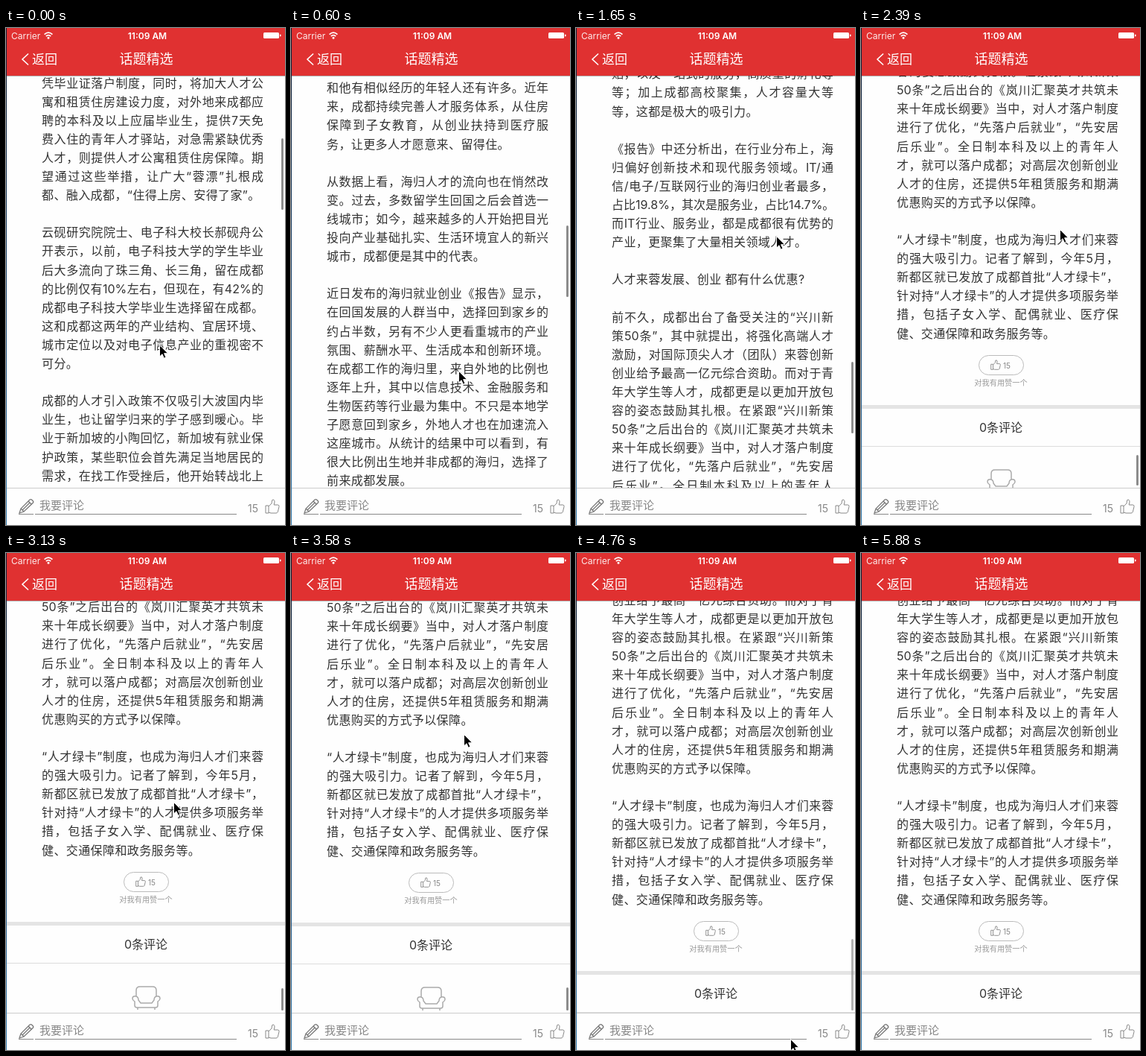
Animation, 375 px wide and 667 px high, one loop 5.91 s. Source, as an HTML page:

```html
<!DOCTYPE html>
<html lang="zh-CN">
<head>
<meta charset="utf-8">
<style>
html, body { margin: 0; width: 100%; height: 100%; overflow: hidden; }
body { position: relative; background: #fefefe; color: #333; font: 16px Inter, "Noto Sans CJK SC", sans-serif; text-spacing-trim: space-all; }
body * { position: absolute; box-sizing: border-box; white-space: pre; }
svg { fill: none; stroke: #888; overflow: visible; }
#page { left: 0; top: 0; width: 375px; }
.line { left: 48px; width: 298px; height: 25px; line-height: 25px; text-align-last: justify; }
.line.last { text-align-last: left; letter-spacing: .4px; }
.mid { left: 1px; width: 374px; text-align: center; }
#bar { left: 370px; width: 3px; border-radius: 2px; background: #8c8c8c; }
#head { left: 0; top: 0; width: 375px; height: 64px; background: #e03131; color: #fff; box-shadow: 0 1px rgba(0, 0, 0, .3); }
#foot { left: 0; top: 617px; width: 375px; height: 50px; background: #fefefe; border-top: 1px solid #ccc; color: #888; font-size: 15px; line-height: 20px; }
#edge { left: 0; top: 0; width: 1px; height: 667px; background: linear-gradient(#101c30, #24507a 55%, #3d83b5); }
</style>
</head>
<body>
<svg width="0" height="0"><symbol id="like" viewBox="0 0 20 20" overflow="visible">
  <path d="M1 9h4v10H1zM5 10l4-4 .8-4.500q3-1.500 3.200 2.500l-.8 4h5.300q2 .3 1.500 2.500l-1.700 7q-.6 1.500-2.300 1.500H8l-3-1"/>
</symbol></svg>

<div id="page"></div>
<div id="bar"></div>

<div id="head">
  <span style="left:7px;top:3px;font-size:12px;line-height:15px;opacity:.9">Carrier</span>
  <svg style="left:51px;top:5px;stroke:#fff;stroke-width:1.700" width="12" height="10"><path d="M.6 3.600q5.400-5 10.800 0M2.800 6q3.200-2.800 6.400 0"/><circle cx="6" cy="8.300" r=".7"/></svg>
  <b style="left:0;width:380px;top:3px;text-align:center;font-size:12px;line-height:15px;font-weight:600">11:09 AM</b>
  <svg style="left:346px;top:6px;stroke:none;fill:#fff" width="24" height="8"><rect width="21" height="8" rx="1.500"/><rect x="22" y="2.500" width="1.500" height="3" rx=".7"/></svg>
  <svg style="left:21px;top:34px;stroke:#fff;stroke-width:1.600" width="10" height="16"><path d="M9 .5L1 8l8 7.500"/></svg>
  <span style="left:35px;top:30px;font-size:17px;line-height:24px">返回</span>
  <span style="left:0;width:377px;top:30px;text-align:center;font-size:18px;line-height:24px">话题精选</span>
</div>

<div id="foot">
  <svg style="left:17px;top:13px;stroke:#777;stroke-width:1.300" width="22" height="22"><path d="M1 20l2-6L15 2q1.500-1 3 .5l1 1q1.500 1.500 0 3L7 18zM3 14l4 4M13 4l4.500 4.500M5.500 15.500L15 6"/></svg>
  <div style="left:17px;top:34px;width:20px;height:1px;background:#888"></div>
  <div style="left:39px;top:34px;width:271px;height:1px;background:#888"></div>
  <span style="left:45px;top:13px">我要评论</span>
  <span style="left:325px;top:17px;font-size:14px">15</span>
  <svg style="left:348px;top:14px" width="20" height="20"><use href="#like"/></svg>
</div>
<div id="edge"></div>
<svg id="cursor" style="left:0;top:0;stroke:#fff;fill:#000" width="13" height="19"><path d="M.5.500v15.500l3.500-3.300 2.400 5.500 2.600-1.100-2.400-5.400h5z"/></svg>

<script>
const text = `凭毕业证落户制度，同时，将加大人才公
寓和租赁住房建设力度，对外地来成都应
聘的本科及以上应届毕业生，提供7天免
费入住的青年人才驿站，对急需紧缺优秀
人才，则提供人才公寓租赁住房保障。期
望通过这些举措，让广大“蓉漂”扎根成
都、融入成都，“住得上房、安得了家”。

云砚研究院院士、电子科大校长郝砚舟公
开表示，以前，电子科技大学的学生毕业
后大多流向了珠三角、长三角，留在成都
的比例仅有10%左右，但现在，有42%的
成都电子科技大学毕业生选择留在成都。
这和成都这两年的产业结构、宜居环境、
城市定位以及对电子信息产业的重视密不
可分。

成都的人才引入政策不仅吸引大波国内毕
业生，也让留学归来的学子感到暖心。毕
业于新加坡的小陶回忆，新加坡有就业保
护政策，某些职位会首先满足当地居民的
需求，在找工作受挫后，他开始转战北上
广深，最终却在成都找到了理想的工作。
这里的生活节奏舒适，发展机会也不少，
“公司对年轻人的培养很用心。”他说，身
边的同学也陆续来到这里落户安家。

和他有相似经历的年轻人还有许多。近年
来，成都持续完善人才服务体系，从住房
保障到子女教育，从创业扶持到医疗服
务，让更多人才愿意来、留得住。

从数据上看，海归人才的流向也在悄然改
变。过去，多数留学生回国之后会首选一
线城市；如今，越来越多的人开始把目光
投向产业基础扎实、生活环境宜人的新兴
城市，成都便是其中的代表。

近日发布的海归就业创业《报告》显示，
在回国发展的人群当中，选择回到家乡的
约占半数，另有不少人更看重城市的产业
氛围、薪酬水平、生活成本和创新环境。
在成都工作的海归里，来自外地的比例也
逐年上升，其中以信息技术、金融服务和
生物医药等行业最为集中。不只是本地学
子愿意回到家乡，外地人才也在加速流入
这座城市。从统计的结果中可以看到，有
很大比例出生地并非成都的海归，选择了
前来成都发展。

禾舟聘才西区市场公关部经理沈芸表示，
在2014年之前，一线城市的人才“流入
率”远高于二线城市。但是2014年后，一
二线城市之间的人才“流入率”差距开始缩
小。尤其是像成都这种“新一线城市”，其
对人才的吸引力急剧上升。而目前，从该
机构的数据来看，成都的人才“流入率”已
经远高于“流出率”。

沈芸表示，城市的经济发展、宜居环境、
人才发展的机会空间等，都是海归们看重
的条件。成都除了在这些方面有着硬实
力，更是在近些年来出台了一系列扶持人
才创新创业、吸引人才来蓉发展的有关政
策，这成为了吸引海归人才的绝佳优势。
创业初期，创业者对成本的优惠、对便利
条件、对政策支持都会有重要考量。成都
的一系列政策，给了创业者多种成本补
贴，以及一站式的服务，高质量的孵化等
等；加上成都高校聚集，人才容量大等
等，这都是极大的吸引力。

《报告》中还分析出，在行业分布上，海
归偏好创新技术和现代服务领域。IT/通
信/电子/互联网行业的海归创业者最多，
占比19.8%，其次是服务业，占比14.7%。
而IT行业、服务业，都是成都很有优势的
产业，更聚集了大量相关领域人才。

人才来蓉发展、创业 都有什么优惠?

前不久，成都出台了备受关注的“兴川新
策50条”，其中就提出，将强化高端人才
激励，对国际顶尖人才（团队）来蓉创新
创业给予最高一亿元综合资助。而对于青
年大学生等人才，成都更是以更加开放包
容的姿态鼓励其扎根。在紧跟“兴川新策
50条”之后出台的《岚川汇聚英才共筑未
来十年成长纲要》当中，对人才落户制度
进行了优化，“先落户后就业”，“先安居
后乐业”。全日制本科及以上的青年人
才，就可以落户成都；对高层次创新创业
人才的住房，还提供5年租赁服务和期满
优惠购买的方式予以保障。

“人才绿卡”制度，也成为海归人才们来蓉
的强大吸引力。记者了解到，今年5月，
新都区就已发放了成都首批“人才绿卡”，
针对持“人才绿卡”的人才提供多项服务举
措，包括子女入学、配偶就业、医疗保
健、交通保障和政务服务等。`;

const pitch = 25.1, maxScroll = 2119, period = 5910, step = 148.7;
const $ = id => document.getElementById(id);
const lines = text.split("\n");
const end = Math.round(74 + pitch * (lines.length - 1)); // middle of the last line

$("page").innerHTML = lines.map((s, k) =>
  `<div class="line${lines[k + 1] ? "" : " last"}" style="top:${Math.round(61.5 + pitch * k)}px">${s}</div>`
).join("") + `
<div style="left:158px;top:${end + 29}px;width:61px;height:27px;border:1px solid #bbb;border-radius:14px"></div>
<svg style="left:174px;top:${end + 35}px" width="14" height="14"><use href="#like" stroke-width="1.3"/></svg>
<span style="left:191px;top:${end + 36}px;font-size:10px;line-height:15px;color:#888">15</span>
<div class="mid" style="top:${end + 59}px;font-size:10.2px;line-height:15px;color:#999">对我有用赞一个</div>
<div class="mid" style="top:${end + 96}px;height:5px;background:#e4e4e4"></div>
<div class="mid" style="top:${end + 114}px;line-height:24px">0条评论</div>
<div class="mid" style="top:${end + 151}px;height:1px;background:#ddd"></div>
<svg style="left:169px;top:${end + 182}px;stroke:#aaa;stroke-width:1.5" width="40" height="33">
<path d="M6 14V6q0-5 5-5h17q5 0 5 5v8M6 14q-5-1-5 3 0 2 3 4v5q0 3 3 3h25q3 0 3-3v-5q3-2 3-4 0-4-5-3-3 1-3 5l-3 4H12l-3-4q0-4-3-5M8 29v3M31 29v3"/></svg>`;

// Keys are [step, value, ...], joined by straight lines
const scrollKeys = [[0, 0], [7, 1174], [11, 1719], [14, 1904], [15, 2034], [16, 2174], [18, 2129],
  [19, 2129], [21, 2185], [23, 2194], [28, 2145], [31, maxScroll]];
const cursorKeys = [[0, 206, 425], [2, 212, 300], [4, 225, 460], [5, 230, 330], [7, 239, 480], [11, 269, 279],
  [14, 262, 440], [16, 267, 270], [19, 240, 440], [21, 225, 334], [28, 242, 122], [31, 271, 620], [32, 288, 652], [33, 300, 700]];

function at(keys, i) {
  const n = keys.findIndex(k => k[0] > i);
  if (n < 0) return keys.at(-1).slice(1);
  const a = keys[n - 1], b = keys[n], f = (i - a[0]) / (b[0] - a[0]);
  return a.slice(1).map((v, j) => Math.round(v + (b[j + 1] - v) * f));
}

function draw() {
  const t = performance.now() % period;
  const i = Math.floor((t + 4) / step);
  const [scroll] = at(scrollKeys, i);
  const [x, y] = at(cursorKeys, i);
  const past = scroll - maxScroll, over = Math.max(0, past);
  const bar = $("bar").style;
  $("page").style.transform = `translateY(${-scroll}px)`;
  $("cursor").style.transform = `translate(${x}px,${y}px)`;
  // The bar shrinks when pulled past the end and fades once at rest
  bar.top = Math.round(518 + (over || past / 5.73)) + "px";
  bar.height = 96 - over + "px";
  bar.opacity = Math.min(1, Math.max(0, (34 - i) / 3));
  requestAnimationFrame(draw);
}
draw();
</script>
</body>
</html>
```
